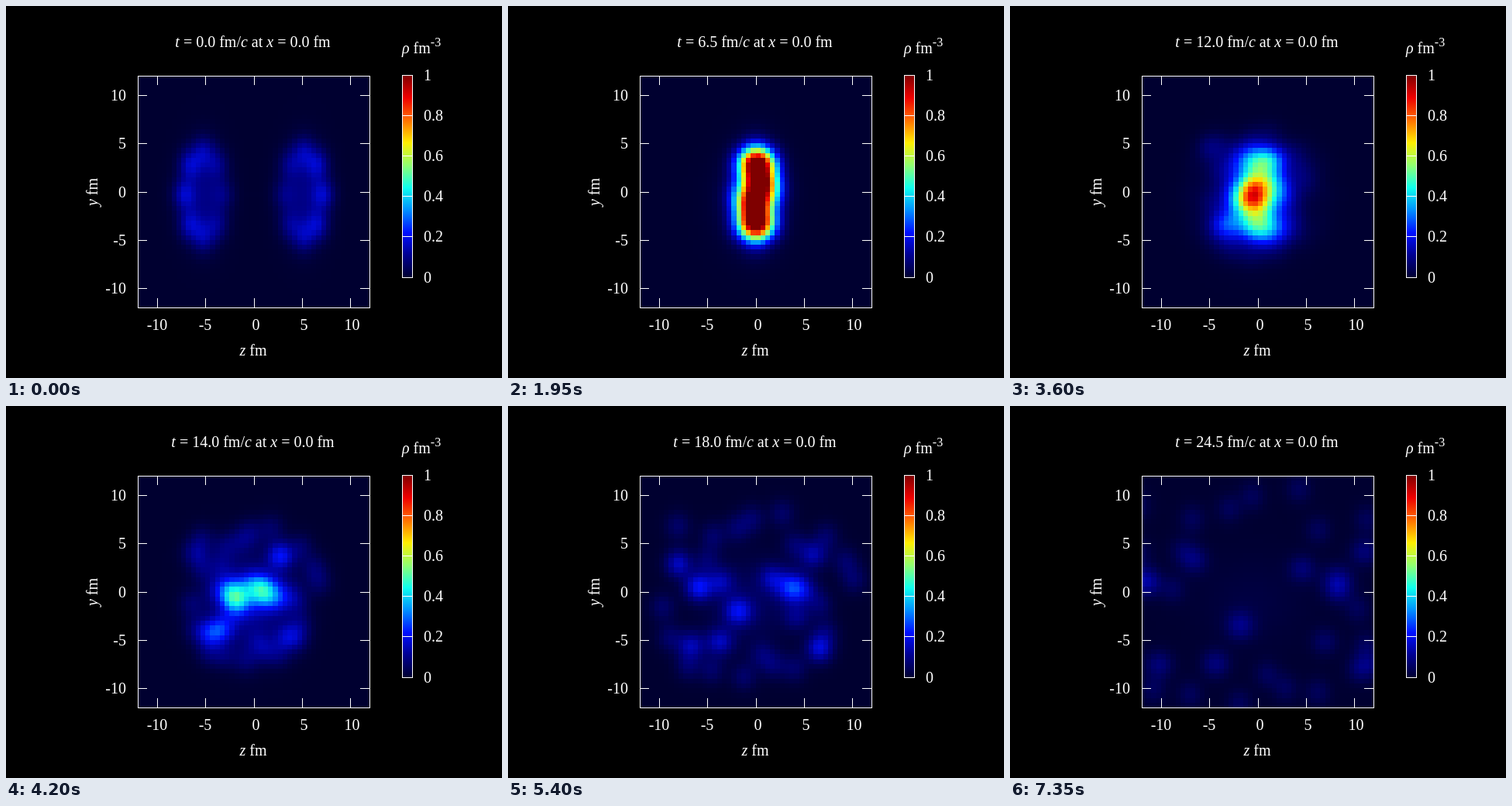
Recreate the animation shown at these times as an HTML page with a canvas. Size 640 by 480 pixels, loop 7.5 s.

```html
<!DOCTYPE html>
<html lang="en">
<head>
<meta charset="utf-8">
<title>Density of two colliding nuclei</title>
<style>
  html, body { margin: 0; width: 100%; height: 100%; overflow: hidden; background: #000; }
  canvas, svg { position: absolute; left: 0; top: 0; display: block; }
  text { font: 20px "Liberation Serif", "Times New Roman", serif; fill: #fff; }
  .it { font-style: italic; }
  .mid { text-anchor: middle; }
  .end { text-anchor: end; }
  .line { fill: none; stroke: #fff; stroke-width: 1; shape-rendering: crispEdges; }
</style>
</head>
<body>
<canvas id="field" width="640" height="480"></canvas>
<svg width="640" height="480" viewBox="0 0 640 480">
  <defs><linearGradient id="scale" x1="0" y1="1" x2="0" y2="0"></linearGradient></defs>
  <text class="mid" x="318.500" y="53"><tspan class="it">t</tspan> = <tspan id="clock">0.0</tspan> fm/<tspan class="it">c</tspan> at <tspan class="it">x</tspan> = 0.0 fm</text>
  <text class="mid" x="319" y="451"><tspan class="it">z</tspan> fm</text>
  <text class="mid" transform="translate(118 240) rotate(-90)"><tspan class="it">y</tspan> fm</text>
  <text x="511" y="61"><tspan class="it">ρ</tspan> fm<tspan dy="-9" style="font-size:16px">-3</tspan></text>
  <rect x="511.500" y="89.500" width="13" height="261" fill="url(#scale)"/>
  <g id="labels"></g>
  <path id="lines" class="line"/>
</svg>
<script>
const STEP = 150, STEPS = 50, CELLS = 48;
const LEFT = 170, TOP = 90, SIZE = 299;
const PALETTE = ['#000030', '#000090', '#000fff', '#0090ff', '#0fffee',
                 '#90ff70', '#ffee00', '#ff7000', '#ee0000', '#7f0000'];

// Value at t on straight lines through [time, value] points.
function ramp(t, points) {
  const next = points.findIndex(p => t <= p[0]);
  if (next === 0) return points[0][1];
  if (next < 0) return points[points.length - 1][1];
  const [t0, v0] = points[next - 1], [t1, v1] = points[next];
  return v0 + (v1 - v0) * (t - t0) / (t1 - t0);
}

function seeded(seed) {
  return () => (seed = (seed * 16807) % 2147483647) / 2147483647;
}

// Each part calls add(z, y, height, spread in z, spread in y).

// A nucleus is a soft ellipse with a lumpy rim, brighter on its outer side.
function nucleus(t, side, add) {
  const weight = ramp(t, [[3.5, 1], [9.5, .35], [13, 0]]);
  const z = side * (5.2 - .87 * t), y = -.3, lumps = 8;
  add(z, y, .09 * weight, 1.5, 3.2);
  for (let i = 0; i < lumps; i++) {
    const a = i * 2 * Math.PI / lumps;
    add(z + side * 2 * Math.cos(a), y + 4.4 * Math.sin(a),
        (.1 + .035 * Math.cos(a)) * weight, .8, 1.1);
  }
}

// The compressed column: four overlapping lumps that stretch along y.
function column(t, add) {
  const height = ramp(t, [[1, 0], [3.5, .2], [7, .92], [9.5, .84], [14, 0]]);
  const stretch = ramp(t, [[3.5, .65], [7, 1]]);
  const width = .55 + .7 * stretch + .15 * Math.max(0, t - 9.5);
  for (let i = 0; i < 4; i++) {
    add(.15 + .35 * Math.sin(2 * i), stretch * (3.3 - 2.2 * i) - .2, height, width, 1.1);
  }
}

function halo(t, add) {
  const height = ramp(t, [[3.5, 0], [9.5, .08], [14, .13], [16, .075], [20.5, .02]]);
  add(-.5, -1, height, 2.4 + .1 * Math.max(0, t - 9.5), 3.2);
}

// Main fragments at t = 16: [z, y, speed in z, speed in y, height].
const fragments = [
  [2.5, .2, .68, .1, .4], [.8, 1.1, .45, .15, .15], [-1.8, -1.6, 0, -.22, .24],
  [-2.7, .3, -.45, .35, .15], [-4.2, .4, -.9, .1, .19], [-3.5, -4.5, -.1, -.35, .19],
  [-5.6, -5, -.54, -.3, .18], [4.4, 3.7, .78, .05, .17], [5, -5.2, .76, -.28, .14],
  [-7, 3.4, -.5, -.3, .11], [3.4, -1.8, .42, -.4, .1]
];
const emerged = t => ramp(t, [[9.5, 0], [15, 1]]);
const thinned = (height, t) => 1 / (1 / height + .8 * Math.max(0, t - 16));

function debris(t, add) {
  const age = t - 16;
  for (const [z, y, vz, vy, height] of fragments) {
    const spread = .9 + .5 * height;
    add(z + vz * age, y + vy * age, emerged(t) * thinned(height, t), spread, spread);
  }
  // Faint outer pieces, spread by the golden angle and flying outwards.
  const random = seeded(7);
  for (let i = 0; i < 24; i++) {
    const a = 2.4 * i, r = 4.5 + 5 * random();
    add(r * Math.cos(a) * (t - 6) / 10, r * Math.sin(a) * (t + 3) / 19,
        emerged(t) * thinned(.07, t), .9, 1);
  }
}

const centres = Array.from({ length: CELLS }, (_, i) => (i + .5) * 24 / CELLS - 12);
const profile = (mean, spread) => centres.map(c => Math.exp(-((c - mean) ** 2) / (2 * spread ** 2)));

function density(t) {
  const grid = new Float64Array(CELLS * CELLS);
  const add = (z, y, height, spreadZ, spreadY) => {
    if (height <= 0) return;
    const across = profile(z, spreadZ), up = profile(y, spreadY);
    grid.forEach((_, k) => {
      grid[k] += height * up[Math.floor(k / CELLS)] * across[k % CELLS];
    });
  };
  nucleus(t, -1, add);
  nucleus(t, 1, add);
  column(t, add);
  halo(t, add);
  debris(t, add);
  return grid;
}

const rgb = PALETTE.map(c => [1, 3, 5].map(i => parseInt(c.slice(i, i + 2), 16)));
function colour(value) {
  const x = Math.min(value, 1) * (rgb.length - 1);
  const i = Math.min(Math.floor(x), rgb.length - 2);
  const mix = rgb[i].map((c, k) => Math.round(c + (rgb[i + 1][k] - c) * (x - i)));
  return `rgb(${mix})`;
}

const byId = id => document.getElementById(id);
const ctx = byId('field').getContext('2d');
const edge = i => Math.round(i * SIZE / CELLS);

function draw(t) {
  byId('clock').textContent = t.toFixed(1);
  const grid = density(t);
  for (let r = 0; r < CELLS; r++) {
    const y0 = edge(CELLS - 1 - r), y1 = edge(CELLS - r);
    for (let c = 0; c < CELLS; c++) {
      ctx.fillStyle = colour(grid[r * CELLS + c]);
      ctx.fillRect(LEFT + edge(c), TOP + y0, edge(c + 1) - edge(c), y1 - y0);
    }
  }
}

function buildAxes() {
  const label = (s, x, y, cls) => `<text class="${cls}" x="${x}" y="${y}">${s}</text>`;
  const right = LEFT + SIZE, bottom = TOP + SIZE;
  let path = `M${LEFT + .5} ${TOP + .5}h${SIZE}v${SIZE}h${-SIZE}z`, text = '';
  for (let v = -10; v <= 10; v += 5) {
    const x = Math.round(LEFT + (v + 12) * SIZE / 24) + .5;
    const y = Math.round(TOP + (12 - v) * SIZE / 24) + .5;
    path += `M${x} ${TOP}v12M${x} ${bottom}v-12M${LEFT} ${y}h12M${right} ${y}h-12`;
    text += label(v, x + (v < 0 ? -.5 : 2), 418, 'mid') + label(v, 155, y + 6.5, 'end');
  }
  path += 'M511.5 89.5h13v261h-13z';
  for (let i = 0; i <= 5; i++) {
    const y = Math.floor(350 - i * 52.2) + .5;
    path += `M511 ${y}h14`;
    text += label(i / 5, 539, y + 6.5, '');
  }
  byId('lines').setAttribute('d', path);
  byId('labels').innerHTML = text;
  byId('scale').innerHTML = PALETTE.map((c, i) =>
    `<stop offset="${i / (PALETTE.length - 1)}" stop-color="${c}"/>`).join('');
}

let shown = -1;
function tick() {
  const step = Math.floor(performance.now() / STEP) % STEPS;
  if (step !== shown) draw((shown = step) / 2);
  requestAnimationFrame(tick);
}
buildAxes();
tick();
</script>
</body>
</html>
```
